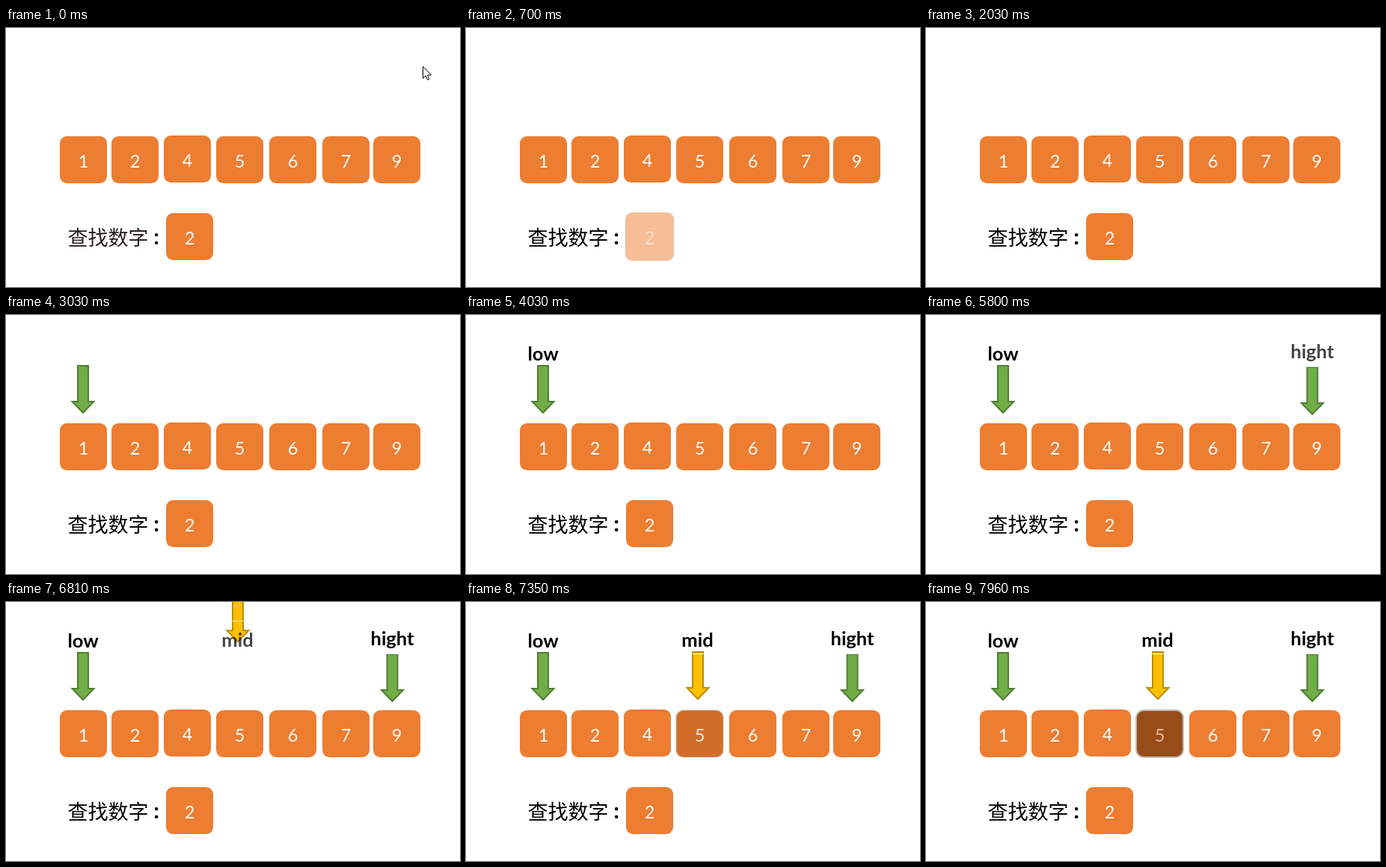
An HTML page with a canvas for the animation above (8 s loop, 607 by 347 pixels).

```html
<!DOCTYPE html>
<html lang="zh">
<head>
<meta charset="utf-8">
<title>二分查找</title>
<style>
html, body { margin: 0; width: 100%; height: 100%; overflow: hidden; background: #fff; }
canvas { display: block; }
</style>
</head>
<body>
<canvas id="stage" width="607" height="347"></canvas>
<script>
const ctx = document.getElementById('stage').getContext('2d');
const LOOP = 8000;
const ORANGE = [237, 125, 49], BROWN = [152, 76, 24];
const GREEN = ['#70ad47', '#507e32'], GOLD = ['#ffc000', '#bc8c00'];
const CARDS = [
  [72, 145, 1], [141, 145, 2], [211, 144, 4], [281, 145, 5],
  [352, 145, 6], [423, 145, 7], [491, 145, 9]
];
const SIZE = 63;

const ramp = (t, from, to) => Math.min(1, Math.max(0, (t - from) / (to - from)));
const mix = (a, b, p) => `rgb(${a.map((v, i) => Math.round(v + (b[i] - v) * p))})`;

function text(str, x, y, font, color, align = 'center') {
  ctx.font = font;
  ctx.fillStyle = color;
  ctx.textAlign = align;
  ctx.fillText(str, x, y);
}

function card(x, y, digit, fill = mix(ORANGE, ORANGE, 0), ink = '#fff') {
  ctx.beginPath();
  ctx.roundRect(x, y, SIZE, SIZE, 9.5);
  ctx.fillStyle = fill;
  ctx.fill();
  text(digit, x + SIZE / 2, y + 42, '23.5px Lato, Carlito, sans-serif', ink);
}

// Darkens in coarse steps while a grey outline appears.
function checkedCard(x, y, digit, t) {
  const p = t < 7190 ? 0 : Math.min(1, (Math.floor((t - 7190) / 154) + 1) / 6);
  card(x, y, digit, mix(ORANGE, BROWN, p), mix([255, 255, 255], [230, 183, 152], p));
  if (!p) return;
  ctx.globalAlpha = p;
  ctx.strokeStyle = '#bfbfbf';
  ctx.lineWidth = 2;
  ctx.beginPath();
  ctx.roundRect(x, y, SIZE, SIZE, 10);
  ctx.stroke();
  ctx.globalAlpha = 1;
}

function wanted(t) {
  const p = t < 1700 ? ramp(t, 310, 700) : 1 - ramp(t, 1640, 2030);
  const scale = 1 + 0.035 * p;
  ctx.save();
  ctx.globalAlpha = 1 - 0.5 * p;
  ctx.translate(245.5, 279.5);
  ctx.scale(scale, scale);
  card(-SIZE / 2, -SIZE / 2, 2);
  ctx.restore();
}

// Flies down from above the stage in half a second.
function arrow(cx, top, [fill, line], t, start) {
  if (t < start) return;
  const y = top - (1 - ramp(t, start, start + 500)) * (top + 65);
  const shaft = 7, head = 14.5, neck = 48, tip = 63;
  ctx.beginPath();
  [[-shaft, 0], [shaft, 0], [shaft, neck], [head, neck], [0, tip], [-head, neck], [-shaft, neck]]
    .forEach(([dx, dy]) => ctx.lineTo(cx + dx, y + dy));
  ctx.closePath();
  ctx.fillStyle = fill;
  ctx.fill();
  ctx.strokeStyle = line;
  ctx.lineWidth = 2;
  ctx.stroke();
}

function label(str, cx, y, t, start) {
  ctx.globalAlpha = ramp(t, start, start + 930);
  text(str, cx, y, 'bold 25.5px Lato, Carlito, sans-serif', '#000');
  ctx.globalAlpha = 1;
}

// Faint text box edge where it crosses an arrow.
function edge(cx, y, t, start) {
  ctx.globalAlpha = 0.9 * ramp(t, start, start + 930);
  ctx.fillStyle = '#fff';
  ctx.fillRect(cx - 8, y, 16, 1);
  ctx.globalAlpha = 1;
}

function pointer(x, y) {
  ctx.beginPath();
  [[0, 0], [0, 16], [3.7, 12.5], [6, 18], [8.3, 17], [6, 11.6], [11, 11.5]]
    .forEach(([dx, dy]) => ctx.lineTo(x + 0.5 + dx, y + 0.5 + dy));
  ctx.closePath();
  ctx.fillStyle = '#fff';
  ctx.fill();
  ctx.strokeStyle = '#000';
  ctx.lineWidth = 1;
  ctx.stroke();
}

function draw(t) {
  ctx.fillStyle = '#fff';
  ctx.fillRect(0, 0, 607, 347);

  CARDS.forEach(([x, y, digit]) =>
    digit === 5 ? checkedCard(x, y, digit, t) : card(x, y, digit));

  const ink = mix([38, 32, 30], [0, 0, 0], ramp(t, 80, 400));
  text('查找数字', 82.5, 291, '500 27px "Noto Sans CJK SC", "Noto Sans CJK", serif', ink, 'left');
  text(':', 201, 290, 'bold 27px "Noto Serif", serif', ink);
  wanted(t);

  arrow(103, 68, GREEN, t, 2500);
  label('low', 103, 61, t, 3110);

  arrow(516.5, 70, GREEN, t, 4570);
  edge(516.5, 69, t, 5110);
  label('hight', 516.5, 58, t, 5110);

  arrow(310, 67, GOLD, t, 6602);
  if (t >= 6602) {
    edge(310, 25, t, 6130);
    edge(310, 69, t, 6130);
  }
  label('mid', 309.5, 59.5, t, 6130);

  if (t < 370) {
    const p = ramp(t, 80, 370);
    pointer(557 - 12 * p, 51 - 48 * p);
  } else if (t >= 1700 && t < 1900) {
    pointer(590 + 17 * ramp(t, 1700, 1900), 31);
  }
}

const begin = performance.now();
function tick() {
  draw((performance.now() - begin) % LOOP);
  requestAnimationFrame(tick);
}
tick();
</script>
</body>
</html>
```
